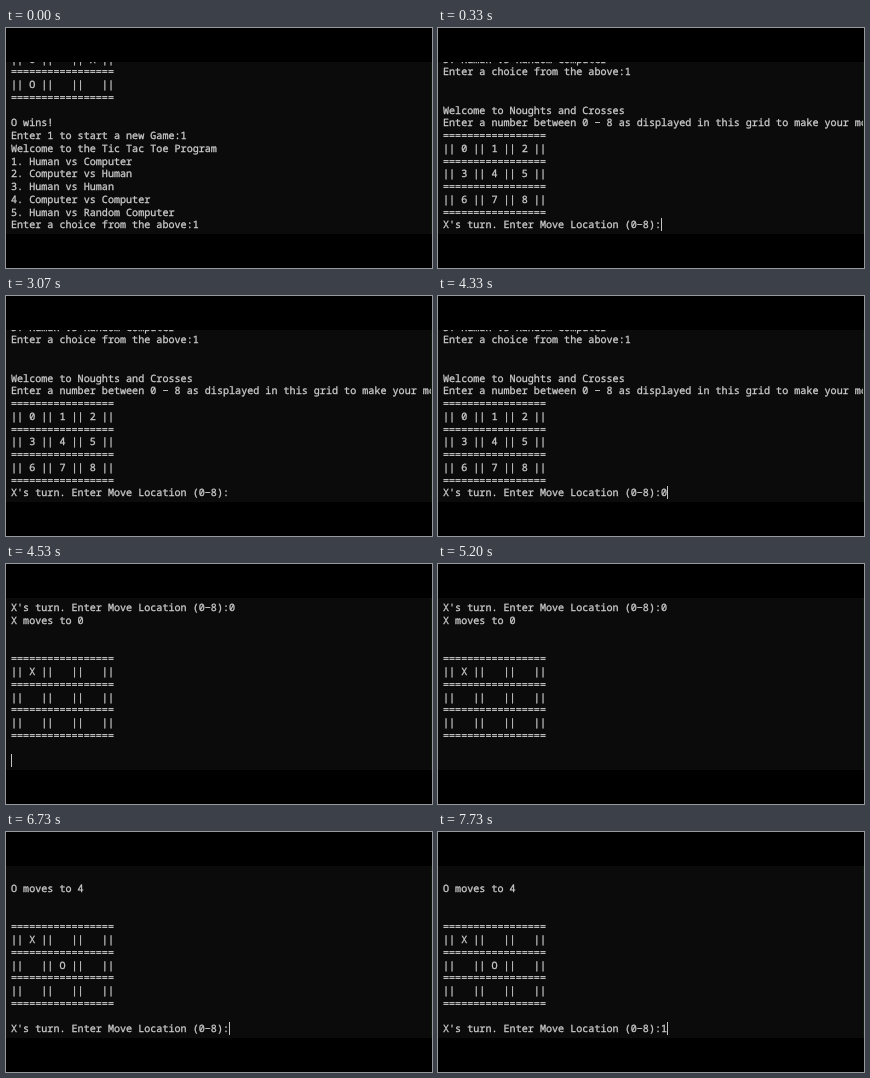
These frames come from a looping animation (426x240 px, 8000 ms). An HTML page:

```html
<!DOCTYPE html>
<html lang="en">
<head>
<meta charset="utf-8">
<title>Tic Tac Toe in a terminal</title>
<style>
  html, body {
    margin: 0;
    width: 100%;
    height: 100%;
    overflow: hidden;
    background: #000;
  }
  .terminal {
    position: absolute;
    left: 0;
    top: 34px;
    box-sizing: border-box;
    width: 426px;
    height: 172px;
    overflow: hidden;
    border-right: 1px solid #0a160a;
    background: #0b0b0b;
    color: #ccc;
  }
  pre {
    position: absolute;
    left: 5px;
    top: -9.45px;
    margin: 0;
    font: 10.1px/12.75px "Noto Sans Mono", "DejaVu Sans Mono", monospace;
    text-rendering: geometricPrecision;
    font-variant-ligatures: none;
    -webkit-text-stroke: 0.3px #ccc;
  }
  .cursor {
    position: absolute;
    left: 0;
    top: 156px;
    width: 1px;
    height: 13px;
    background: #c4c4c4;
    animation: blink 8s step-end infinite, travel 8s step-end infinite;
  }
  pre, pre span { animation: 8s step-end infinite; }
  #menu    { animation-name: menu; }
  #start   { animation-name: start; }
  #moveX   { animation-name: moveX; }
  #moveO   { animation-name: moveO; }
  #typed0  { animation-name: typed0; }
  #prompt  { animation-name: prompt; }
  #typed1  { animation-name: typed1; }

  @keyframes menu   { 0% { opacity: 1 } 4.125%, 100% { opacity: 0 } }
  @keyframes start  { 0% { opacity: 0 } 4.125% { opacity: 1 } 56.625%, 100% { opacity: 0 } }
  @keyframes moveX  { 0% { opacity: 0 } 56.625% { opacity: 1 } 72.5%, 100% { opacity: 0 } }
  @keyframes moveO  { 0% { opacity: 0 } 72.5%, 100% { opacity: 1 } }
  @keyframes typed0 { 0% { opacity: 0 } 53.375%, 100% { opacity: 1 } }
  @keyframes prompt { 0% { opacity: 0 } 84.125%, 100% { opacity: 1 } }
  @keyframes typed1 { 0% { opacity: 0 } 96.625%, 100% { opacity: 1 } }

  @keyframes blink {
    0%, 11.625%, 25%, 38.375%, 52.5%, 65%, 78.375%, 91.625% { opacity: 0 }
    4.125%, 17.5%, 32.5%, 45%, 53.375%, 72.5%, 84.125%, 96.625%, 100% { opacity: 1 }
  }
  @keyframes travel {
    0%, 84.125% { transform: translateX(223px) }
    53.375%, 96.625%, 100% { transform: translateX(229px) }
    56.625% { transform: translateX(5px) }
  }
</style>
</head>
<body>
<div class="terminal">
<pre id="menu">
|| O ||   || X ||
=================
|| O ||   ||   ||
=================

O wins!
Enter 1 to start a new Game:1
Welcome to the Tic Tac Toe Program
1. Human vs Computer
2. Computer vs Human
3. Human vs Human
4. Computer vs Computer
5. Human vs Random Computer
Enter a choice from the above:1</pre>
<pre id="start">
5. Human vs Random Computer
Enter a choice from the above:1


Welcome to Noughts and Crosses
Enter a number between 0 − 8 as displayed in this grid to make your move
=================
|| 0 || 1 || 2 ||
=================
|| 3 || 4 || 5 ||
=================
|| 6 || 7 || 8 ||
=================
X's turn. Enter Move Location (0−8):<span id="typed0">0</span></pre>
<pre id="moveX">

X's turn. Enter Move Location (0−8):0
X moves to 0


=================
|| X ||   ||   ||
=================
||   ||   ||   ||
=================
||   ||   ||   ||
=================</pre>
<pre id="moveO">


O moves to 4


=================
|| X ||   ||   ||
=================
||   || O ||   ||
=================
||   ||   ||   ||
=================

<span id="prompt">X's turn. Enter Move Location (0−8):</span><span id="typed1">1</span></pre>
<div class="cursor"></div>
</div>
</body>
</html>
```
